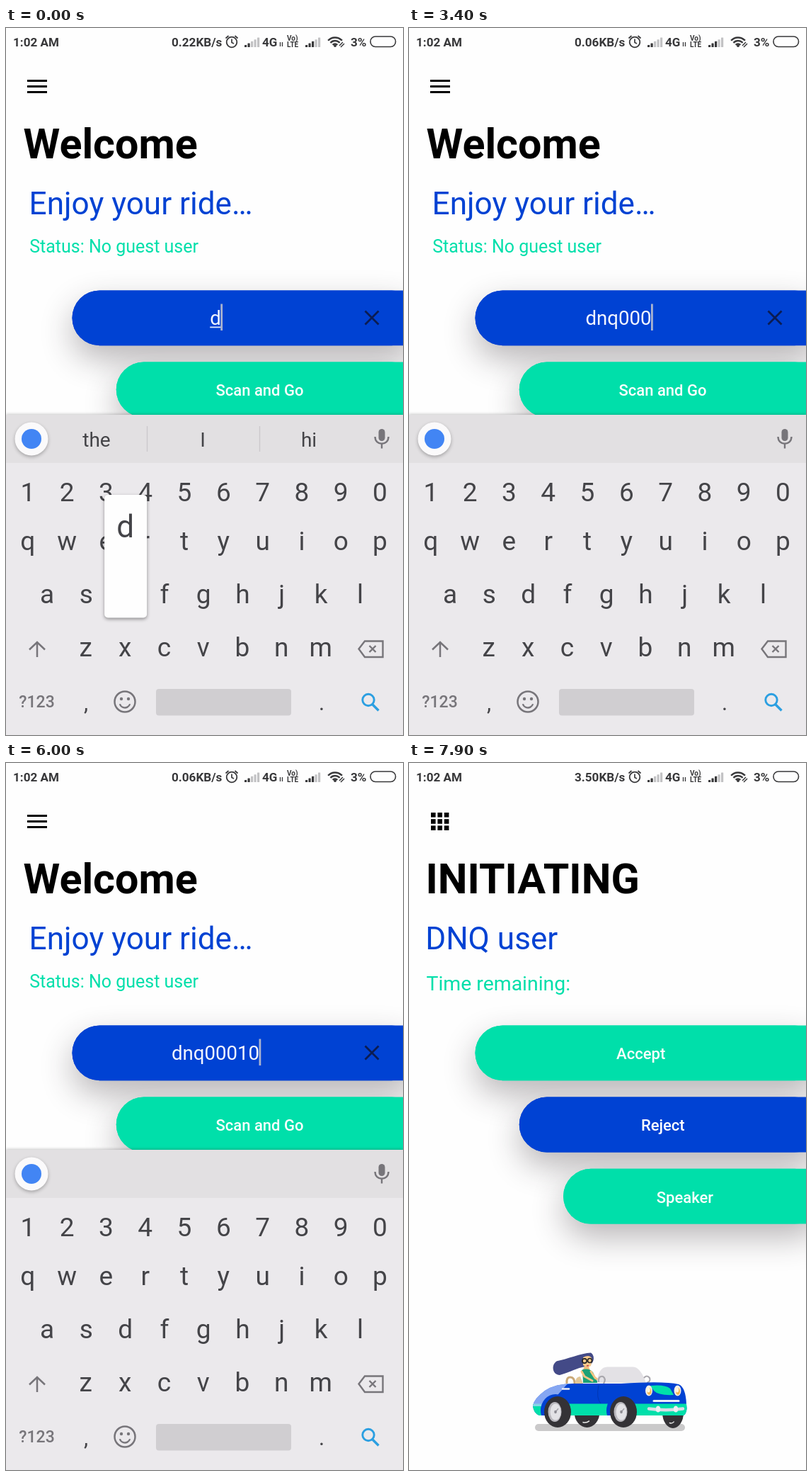
Animation of 561x998 px, one loop 8 s. Source, as an HTML page with a canvas:

```html
<!DOCTYPE html>
<html lang="en">
<head>
<meta charset="utf-8">
<title>Ride request</title>
<style>
html, body { margin: 0; width: 100%; height: 100%; overflow: hidden; background: #fefefe; }
canvas { display: block; width: 561px; height: 998px; }
</style>
</head>
<body>
<canvas id="stage" width="561" height="998"></canvas>
<script>
const W = 561, H = 998, LOOP = 8000, TAU = Math.PI * 2;
const BLUE = '#0042d3', GREEN = '#00dfaa', INK = '#444448', GREY = '#77757a', DARK = '#38383a';
const g = document.getElementById('stage').getContext('2d');

// Each key: popup shown, character entered, popup hidden (ms)
const presses = [
  ['d', -100, 0, 200], ['n', 500, 700, 800], ['q', 900, 1100, 1300],
  ['0', 1900, 2200, 2300], ['0', 2700, 2800, 2900], ['0', 3100, 3200, 3300],
  ['1', 3600, 3800, 3900], ['0', 4200, 4400, 4400]
];
const hints = [
  [0, ['the', 'I', 'hi']], [200, ['d', 'do', 'day']],
  [800, ['dn', 'don', 'in']], [1200, ['dnq', 'fine', 'come']], [2300, []]
];
const rates = [[0, '0.22KB/s'], [3300, '0.06KB/s'], [7400, '3.50KB/s']];
const REFOCUS = 5520, SWAP = 6050, KEYS_DOWN = 6200;

const PITCH = 55.3;
const rows = [
  ['1234567890', 30.8, 668], ['qwertyuiop', 30.8, 737], ['asdfghjkl', 58, 812], ['zxcvbnm', 112.8, 887]
];

const ramp = (t, a, b) => Math.min(1, Math.max(0, (t - a) / (b - a)));
const latest = (list, t) => list.filter(e => e[0] <= t).pop()[1];

function text(s, x, y, size, color, weight = 400, align = 'left') {
  g.font = `${weight} ${size}px Roboto, sans-serif`;
  g.textAlign = align;
  g.fillStyle = color;
  g.fillText(s, x, y);
}
function box(x, y, w, h, r, color) {
  g.beginPath();
  g.roundRect(x, y, w, h, r);
  g.fillStyle = color;
  g.fill();
}
function oval(x, y, rx, ry, color) {
  g.beginPath();
  g.ellipse(x, y, rx, ry, 0, 0, TAU);
  g.fillStyle = color;
  g.fill();
}
function line(d, color, width, cap = 'butt') {
  g.strokeStyle = color;
  g.lineWidth = width;
  g.lineCap = cap;
  g.stroke(new Path2D(d));
}
function shape(d, color) {
  g.fillStyle = color;
  g.fill(new Path2D(d));
}
function ring(x, y, r, color, width, from = 0, to = TAU) {
  g.beginPath();
  g.arc(x, y, r, from, to);
  g.strokeStyle = color;
  g.lineWidth = width;
  g.stroke();
}
function withShadow(color, blur, dy, draw) {
  g.save();
  g.shadowColor = color;
  g.shadowBlur = blur;
  g.shadowOffsetY = dy;
  draw();
  g.restore();
}

function bars(x, lit) {
  for (let i = 0; i < 5; i++) {
    const h = 3 + i * 2.6;
    box(x + i * 4.5, 27 - h, 3.2, h, 0.5, i < lit ? DARK : '#c2c2c4');
  }
}
function statusBar(t) {
  text('1:02 AM', 10, 26, 17.1, DARK, 700);
  text(latest(rates, t), 234, 26, 17.1, DARK, 700);
  ring(319, 20, 7.3, DARK, 1.8);
  line('M319 15.5V20.5L322 22M310.5 14.5L314.5 11M327.5 14.5L323.5 11', DARK, 1.7);
  bars(337, 2);
  text('4G', 362, 26, 17, DARK, 700);
  line('M387.5 20V26M390.5 20V26', DARK, 1.3);
  text('Vo)', 397, 18, 10, DARK, 700);
  text('LTE', 397, 27, 10, DARK, 700);
  bars(423, 3);
  for (const r of [4.5, 9, 13.5]) ring(465, 27, r, DARK, 2.4, -Math.PI * 0.76, -Math.PI * 0.24);
  oval(465, 25, 2, 2, DARK);
  line('M471 25L476 20M473 27L478 22', DARK, 1.5);
  text('3%', 487, 26, 17.1, DARK, 700);
  g.beginPath();
  g.roundRect(515, 12, 35.5, 14.5, 7);
  g.strokeStyle = DARK;
  g.lineWidth = 1.6;
  g.stroke();
}

// Shadows end near the screen edge, the pills run past it
function pills(colors) {
  const pill = (i, right, c) => {
    const x = 93.5 + i * 62.3;
    box(x, 370.4 + i * 101.2, right - x, 77.8, 38.9, c);
  };
  colors.forEach((c, i) => withShadow('rgba(45,35,42,.33)', 46, 19, () => pill(i, 584, c)));
  colors.forEach((c, i) => pill(i, 640, c));
}

function field(t) {
  const typed = presses.filter(p => p[2] <= t);
  const s = typed.map(p => p[0]).join('');
  text(s, 296, 419, 27.6, '#f4f6ff', 400, 'center');
  const w = g.measureText(s).width;
  if (s.length < 4) {
    box(296 - w / 2, 421.5, w, 1.8, 0, '#dfe6fb');
  }
  const since = t - (t >= REFOCUS ? REFOCUS : typed[typed.length - 1][2]);
  if (since % 1010 < 500) box(296 + w / 2 - 0.5, 389.5, 2.8, 37.5, 0, '#a9b3cf');
  line('M507.5 399.5L526.5 418.5M526.5 399.5L507.5 418.5', '#0b1c52', 2.8);
}

function welcome(t) {
  box(0, 0, W, H, 0, '#fefefe');
  line('M30 74.5H58M30 82.5H58M30 90.5H58', '#000', 2.8);
  text('Welcome', 24.5, 183.5, 59.2, '#000', 700);
  text('Enjoy your ride…', 32.6, 263, 44.1, BLUE);
  text('Status: No guest user', 33.2, 317, 25, GREEN);
  pills([BLUE, GREEN]);
  text('Scan and Go', 358.5, 519, 22, '#fff', 500, 'center');
  field(t);
}

function popup(ch) {
  const [letters, x0, base] = rows.find(r => r[0].includes(ch));
  const x = x0 + letters.indexOf(ch) * PITCH;
  const digit = base === 668;
  const top = digit ? 513.5 : base - 153;
  withShadow('rgba(0,0,0,.4)', 5, 2, () => box(x - 29.5, top, 60, digit ? 169.5 : 173.5, 5, '#fefefe'));
  text(ch, x, top + 59.5, 44, INK, 400, 'center');
  if (digit) text('…', x + 16, top + 78, 22, INK, 400, 'center');
}

function keyboard(t) {
  g.save();
  g.translate(0, 453 * ramp(t, KEYS_DOWN - 100, KEYS_DOWN + 250) ** 2);
  withShadow('rgba(0,0,0,.22)', 4, -1, () => box(0, 546, W, H, 0, '#ebe9ec'));
  box(0, 546, W, 68, 0, '#e2e0e2');
  withShadow('rgba(0,0,0,.28)', 5, 2, () => oval(36, 580, 23.5, 23.5, '#fbfafb'));
  oval(36, 580, 14, 14, '#4285f4');

  const words = latest(hints, t);
  words.forEach((s, i) => text(s, 128 + i * 150, 591, 28, INK, 400, 'center'));
  if (words.length) line('M199.5 562V598M358.5 562V598', '#cbc9cc', 1.4);

  box(526.5, 566, 9, 17, 4.5, GREY);
  line('M521.5 577C521.5 590 540.5 590 540.5 577M531 587V593.5', GREY, 2.4);

  for (const [letters, x, y] of rows) {
    [...letters].forEach((c, i) => text(c, x + i * PITCH, y, 37, INK, 400, 'center'));
  }
  line('M44 888V867M33 877.5L44 867L55 877.5', GREY, 2.5);
  line('M498.5 876.5L507 865.5H532.5V888H507Z', GREY, 2.4);
  line('M513.5 872L522.5 881M522.5 872L513.5 881', GREY, 2.4);
  text('?123', 18.3, 959, 23, GREY, 500);
  text(',', 113, 963, 31, INK, 400, 'center');
  text('.', 446, 963, 31, INK, 400, 'center');
  ring(168, 951, 14.5, GREY, 2.5);
  oval(163, 947, 2.2, 2.2, GREY);
  oval(173, 947, 2.2, 2.2, GREY);
  ring(168, 952, 7.5, GREY, 2.3, 0.3, Math.PI - 0.3);
  box(212, 933, 191, 37.5, 4, '#d0ced1');
  if (t >= 4500 && t < 4700) oval(515, 950, 29, 29, 'rgba(0,0,0,.09)');
  ring(512, 948.5, 8.2, '#2b9fe1', 2.9);
  line('M517.5 954.5L526.5 963.5', '#2b9fe1', 3.4);

  const down = presses.find(p => t >= p[1] && t < p[3]);
  if (down) popup(down[0]);
  g.restore();
}

function toast(t) {
  const a = ramp(t, 4600, 4900) * (1 - ramp(t, 5650, 5950));
  if (!a) return;
  g.save();
  g.globalAlpha = a;
  withShadow('rgba(0,0,0,.45)', 4, 2, () => box(104, 831, 352.5, 54.5, 27.2, BLUE));
  ring(144.5, 858.5, 11.8, '#fff', 2.3);
  line('M144.5 857V865M144.5 852V854.5', '#fff', 2.5);
  text('Processing your request..', 175, 866, 21.6, '#fff');
  g.restore();
}

function farWheel(x, y, rx, spin) {
  oval(x, y, rx, 22, '#343236');
  g.beginPath();
  g.ellipse(x - 3, y + 2, rx - 7, 13, 0, 1.1 + 0.25 * Math.sin(spin), 2 + 0.25 * Math.sin(spin));
  g.strokeStyle = '#eee';
  g.lineWidth = 1.4;
  g.stroke();
}
function nearWheel(x, y, spin) {
  oval(x, y, 19, 22, '#343236');
  oval(x - 4, y, 9.5, 14, '#b9b7bd');
  oval(x - 3, y, 7.5, 11.5, '#e3e2e6');
  line(`M${x - 3} ${y}l${5 * Math.cos(spin)} ${8 * Math.sin(spin)}`, '#a5a3a9', 1.5);
  oval(x - 3, y, 1.8, 2.3, '#8f8d94');
}

function driver(t) {
  const sway = Math.sin((t - 6600) / 1300 * Math.PI * 1.5 + 1.2);
  shape(`M257 832.5C243 ${832 - sway * 3} 223 ${841 - sway * 2} 209 ${845 + sway * 2}
    C200 ${850 + sway} 203 864 213 864C229 ${861 + sway * 4} 237 854 249 852C262 851 264 837 257 832.5Z`, '#434a87');
  shape('M246 839Q256 834 259 842L257 851Q252 855 246 850Z', '#f6c98b');
  shape('M248 851L254 852L256 858L245 859Z', '#f0be7c');
  shape('M244 857Q253 853 260 860L267 875H246Q246 865 244 857Z', '#1ca176');
  line('M257 859L263 868L270 872M244 859L248 866L259 872', '#f4c483', 3, 'round');
  ring(248, 844, 3.1, '#222', 1.6);
  ring(255.5, 843.5, 3, '#222', 1.6);
  line('M251 851L254 850.5', '#c8414f', 1.3);
}

function car(t) {
  const spin = t / 1000 * TAU;
  box(178, 933, 212, 10, 5, '#cac9ca');

  const gust = ((t - 6060) % 2000 + 2000) % 2000 / 1000;
  if (gust < 1) {
    const len = 24 * Math.sin(gust * Math.PI);
    const x = 440 - 288 * gust;
    line(`M${x - len / 2} 838.5H${x + len / 2}`, '#b4b3b5', 1.6);
  }

  farWheel(251.5, 916, 18, spin);
  farWheel(373, 917, 15, spin);
  line('M223 876Q222 867 228 867Q234 867 234 876', '#c9a877', 3);
  shape('M235 876Q235 866 242 866L246 876Z', '#e2c695');
  driver(t);
  shape('M266 875Q267 853 280 852.5H317Q327 853 335 875Z', '#e3e1e5');
  line('M268 874Q267 865 274 866Q279 869 275 876M332 868Q336 863 340 868Q342 873 336 875', '#aaa8ae', 2.2);

  const body = 'M175 907Q177 897 192 886Q207 876 231 876H300Q360 872 381 877Q391 881 392 905Q394 917 388 921H184Q176 918 175 907Z';
  g.save();
  g.clip(new Path2D(body));
  box(170, 870, 230, 60, 0, BLUE);
  box(170, 904.5, 230, 20, 0, GREEN);
  const sweep = t - 7050;
  if (sweep > 0) {
    const x = 402 - sweep * 0.24;
    shape(`M${x} 874h28l-30 34h-28z`, 'rgba(190,208,255,.7)');
  }
  for (const x of [207, 300]) oval(x, 914, 21, 23, BLUE);
  g.restore();

  shape('M341 879Q362 877 369 883L374 892Q352 893 346 886Z', GREEN);
  line('M217 883.5H226', '#eef0f7', 2.5, 'round');
  line('M268 878Q264 897 271 904', '#0037b2', 1);
  for (const x of [339, 379.5]) {
    oval(x, 886, 5, 7.5, '#f4efe6');
    oval(x + 0.5, 887, 3, 5, '#f4b753');
    oval(x - 0.5, 885, 2.2, 3.5, '#fff7da');
  }
  line('M346 900.5H381', '#e9edf8', 3, 'round');
  line('M339 911.5Q363 915 387 911.5', '#d9dce7', 4.5, 'round');
  oval(352, 912, 3.2, 4.5, '#eceef4');
  oval(377, 912, 3.2, 4.5, '#eceef4');

  for (const x of [210, 303]) nearWheel(x, 916, spin);
}

function initiating(t) {
  box(0, 0, W, H, 0, '#fefefe');
  for (let i = 0; i < 9; i++) {
    box(31 + i % 3 * 9.4, 70 + Math.floor(i / 3) * 9.2, 6.6, 6.6, 0, '#000');
  }
  text('INITIATING', 23.4, 183.5, 59.2, '#000', 700);
  text('DNQ user', 23.2, 262.5, 44.1, BLUE);
  text('Time remaining:', 24.5, 320.5, 28.4, GREEN);
  pills([GREEN, BLUE, GREEN]);
  ['Accept', 'Reject', 'Speaker'].forEach((s, i) =>
    text(s, 327.7 + i * 31.1, 418 + i * 101.3, 22, '#fff', 500, 'center'));
  car(t);
}

function draw(t) {
  const swap = ramp(t, SWAP, SWAP + 150);
  if (swap < 1) welcome(t);
  if (swap > 0) {
    g.globalAlpha = swap;
    initiating(t);
    g.globalAlpha = 1;
  }
  statusBar(t);
  if (t < KEYS_DOWN + 250) keyboard(t);
  toast(t);
}

let start;
function tick(now) {
  start ??= now;
  // The screen advances in steps of 100 ms
  draw(Math.floor((now - start) % LOOP / 100) * 100);
  requestAnimationFrame(tick);
}
draw(0);
requestAnimationFrame(tick);
</script>
</body>
</html>
```
